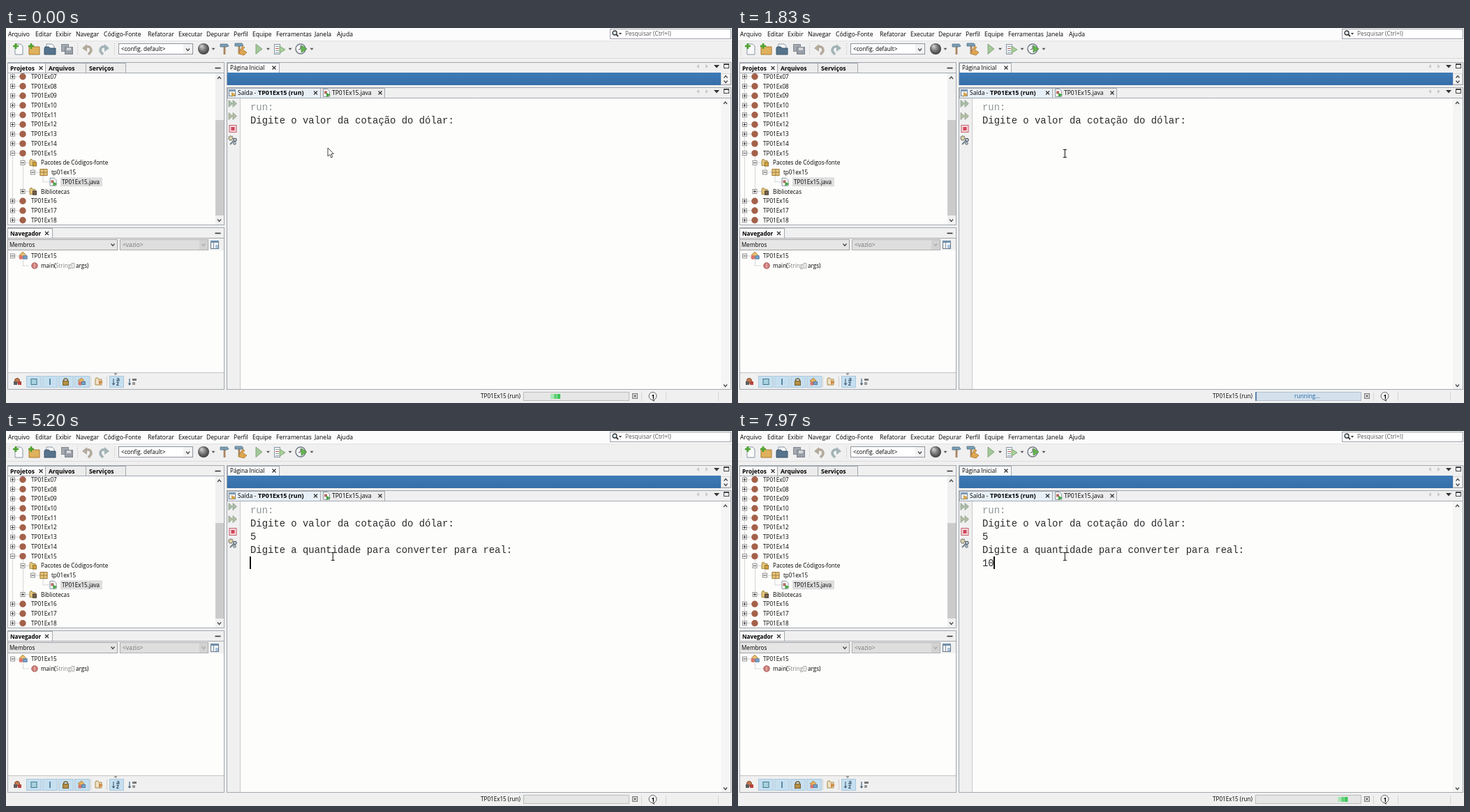
Recreate the animation shown at these times as an HTML page with a canvas. Size 1040 px wide and 538 px high, loop 8000 ms.

```html
<!DOCTYPE html>
<html lang="pt">
<head>
<meta charset="utf-8">
<title>Saída do programa</title>
<style>
html, body { margin: 0; width: 100%; height: 100%; overflow: hidden; background: #f0f0f0; }
canvas { display: block; width: 1040px; height: 538px; }
</style>
</head>
<body>
<canvas id="stage" width="1040" height="538"></canvas>
<script>
const g = document.getElementById('stage').getContext('2d');
const LOOP = 8000, PANEL = '#f0f0f0', PAPER = '#fdfdfc', EDGE = '#a3a9b0';
const UI = '"Open Sans", "Noto Sans", sans-serif';
const MONO = '"Liberation Mono", monospace';

function box(x, y, w, h, fill, edge) {
  if (fill) { g.fillStyle = fill; g.fillRect(x, y, w, h); }
  if (edge) { g.strokeStyle = edge; g.lineWidth = 1; g.strokeRect(x + .5, y + .5, w - 1, h - 1); }
}
function path(pts, fill, edge, width = 1, close = true) {
  g.beginPath();
  for (let i = 0; i < pts.length; i += 2) g.lineTo(pts[i], pts[i + 1]);
  if (close) g.closePath();
  if (fill) { g.fillStyle = fill; g.fill(); }
  if (edge) { g.strokeStyle = edge; g.lineWidth = width; g.stroke(); }
}
const line = (pts, color, width = 1) => path(pts, null, color, width, false);
function disc(x, y, r, fill, edge, width = 1) {
  g.beginPath();
  g.arc(x, y, r, 0, 7);
  if (fill) { g.fillStyle = fill; g.fill(); }
  if (edge) { g.strokeStyle = edge; g.lineWidth = width; g.stroke(); }
}
function text(s, x, y, size = 8.15, color = '#000', weight = 400, family = UI) {
  g.font = `${weight} ${size}px ${family}`;
  g.fillStyle = color;
  g.fillText(s, x, y);
}
const mono = (s, y, color = '#2b2b2b') => text(s, 350, y, 13.9, color, 400, MONO);
const down = (x, y, r = 2.5, color = '#555') => path([x - r, y - r / 2, x + r, y - r / 2, x, y + r / 2 + .5], color);
const cross = (x, y) => {
  line([x - 2.5, y - 2.5, x + 2.5, y + 2.5], '#333', 1.2);
  line([x + 2.5, y - 2.5, x - 2.5, y + 2.5], '#333', 1.2);
};
const chevron = (x, y, dir, color = '#444') => line([x - 2.5, y - dir * 1.5, x, y + dir * 1.5, x + 2.5, y - dir * 1.5], color, 1.2);

function folder(x, y, w, h, fill, edge) {
  path([x, y + 2, x, y + h, x + w, y + h, x + w, y + 2, x + w * .5, y + 2, x + w * .4, y, x + 1, y], fill, edge);
}
function page(x, y, w, h) {
  path([x, y, x + w - 3, y, x + w, y + 3, x + w, y + h, x, y + h], '#fafafa', '#8796a5');
}
function plus(x, y) {
  line([x - 4, y, x + 4, y], '#4da32f', 2.6);
  line([x, y - 4, x, y + 4], '#4da32f', 2.6);
}
function sourceFile(x, y) {
  page(x - 4.5, y - 5.5, 9, 11);
  box(x - 3, y - 2.5, 4, 4, '#b96a63');
  path([x, y, x + 6, y + 3, x, y + 6], '#3da33c');
}
function hammer(x, y) {
  line([x, y - 3, x, y + 8], '#a8855f', 2.8);
  path([x - 6, y - 7, x + 4, y - 7, x + 6, y - 4, x + 3, y - 3, x - 6, y - 3], '#7d9fb4', '#4c7086', .8);
}
function curl(x, y, dir, color) {
  g.beginPath();
  g.moveTo(x - dir * 4, y - 2);
  g.bezierCurveTo(x + dir * 3, y - 6, x + dir * 9, y + 1, x + dir, y + 8);
  g.strokeStyle = color;
  g.lineWidth = 3.6;
  g.stroke();
  path([x - dir * 8, y - 1, x - dir, y - 7, x - dir, y + 4], color);
}

function menuBar() {
  box(0, 0, 1040, 18, '#fcfcfc');
  const items = [['Arquivo', 3], ['Editar', 42], ['Exibir', 71], ['Navegar', 100], ['Código-Fonte', 140],
    ['Refatorar', 203], ['Executar', 247], ['Depurar', 287], ['Perfil', 326], ['Equipe', 353],
    ['Ferramentas', 387], ['Janela', 442], ['Ajuda', 474]];
  for (const [s, x] of items) text(s, x, 12, 8.6);
  box(865, 1, 174, 15, '#fff', '#9aa0a8');
  disc(872, 7, 3, '#dbe8f2', '#333', 1.3);
  line([874, 9, 877, 12], '#333', 1.8);
  down(880, 8, 2.2, '#333');
  text('Pesquisar (Ctrl+I)', 887, 11, 8.3, '#555');
}

function toolBar() {
  line([0, 18.5, 1040, 18.5], '#e2e2e2');
  line([0, 43.5, 1040, 43.5], '#dcdcdc');
  for (const x of [4, 102, 155]) for (let y = 22; y < 40; y += 3) box(x, y, 1, 1, '#b5b5b5');
  page(13, 23, 11, 15);
  plus(14, 26);
  folder(33, 25, 15, 13, '#e0b15c', '#a77b32');
  plus(36, 26);
  page(58, 23, 11, 10);
  folder(55, 27, 16, 11, '#55738c', '#3c5569');
  box(79, 23, 11, 11, '#a4a9b0', '#858b93');
  box(84, 27, 12, 11, '#989ea7', '#7d848c');
  box(87, 28, 6, 4, '#d4d6da');
  curl(117, 30, 1, '#b3aa9c');
  curl(140, 30, -1, '#a3b3b6');
  box(161, 22, 107, 16, '#fff', '#8f969e');
  box(254, 23, 13, 14, '#f2f2f2');
  text('<config. default>', 165, 33);
  chevron(260.5, 31, 1);
  const ball = g.createRadialGradient(280, 26, 1, 283, 30, 9);
  ball.addColorStop(0, '#c9c9c9');
  ball.addColorStop(.5, '#777');
  ball.addColorStop(1, '#333');
  disc(283, 30, 8, ball);
  for (const x of [297, 375.5, 407, 438]) down(x, 30);
  hammer(313, 30);
  hammer(334, 29);
  path([339, 26, 342, 28, 339, 31, 345, 35, 341, 39, 333, 37, 336, 31], '#dda552', '#a9762e', .8);
  path([358, 23, 367, 30, 358, 37.5], '#a4c79a', '#82a77a');
  box(384, 23, 9, 15, '#f6f6f6', '#8796a5');
  for (let y = 26; y < 37; y += 3) box(386, y, 5, 1, y === 29 ? '#d05c50' : '#8b9fb0');
  path([392, 26, 400, 31, 392, 36], '#a9cf9c', '#6f9a63', .8);
  disc(422, 30, 7, '#f4f6f8', '#737d87', 1.5);
  line([422, 25, 422, 30, 419, 31], '#555');
  path([423, 25, 431, 30, 423, 35], '#64b54f', '#468a37', .8);
}

function tab(x, y, w, h, fill) {
  box(x, y, w, h, fill, EDGE);
}
function minus(x, y) {
  line([x - 4, y, x + 4, y], '#333', 1.6);
}
function toggle(x, y, open) {
  box(x - 3.5, y - 3.5, 7, 7, '#fff', '#929292');
  line([x - 2, y, x + 2, y], '#333');
  if (!open) line([x, y - 2, x, y + 2], '#333');
}
function dots(x0, y0, x1, y1) {
  g.setLineDash([1, 1]);
  line([x0, y0, x1, y1], '#b0b0b0');
  g.setLineDash([]);
}

function projectRow(name, y, open) {
  dots(13, y, 20, y);
  toggle(9.5, y, open);
  disc(24, y, 4.7, '#a4614a');
  text(name, 36, y + 3);
}

function projects() {
  box(2, 49, 311, 234, PANEL, EDGE);
  line([2, 64.5, 312, 64.5], EDGE);
  tab(2, 50, 55, 15, '#fafafa');
  tab(56, 50, 59, 15, '#ececec');
  tab(114, 50, 58, 15, '#ececec');
  text('Projetos', 6, 60.5, 8.45, '#000', 700);
  cross(50, 57.5);
  text('Arquivos', 61, 60.5, 8.5, '#000', 700);
  text('Serviços', 119, 60.5, 8.7, '#000', 700);
  minus(303.5, 57.5);
  box(3, 65, 309, 217, PAPER);
  g.save();
  g.beginPath();
  g.rect(3, 65, 297, 217);
  g.clip();
  const row = i => 69.8 + i * 13.73;
  dots(9.5, 65, 9.5, row(15));
  dots(24.5, row(8) + 5, 24.5, row(12));
  dots(39, row(9) + 5, 39, row(10));
  dots(53, row(10) + 5, 53, row(11));
  for (let i = 0; i < 9; i++) projectRow('TP01Ex' + String(i + 7).padStart(2, '0'), row(i), i === 8);
  for (let i = 13; i < 16; i++) projectRow('TP01Ex' + (i + 3), row(i), false);
  dots(24, row(9), 34, row(9));
  toggle(24, row(9), true);
  folder(34, row(9) - 5, 8, 9, '#e3c57c', '#a58a46');
  box(38, row(9) - 1, 6, 6, '#d6a542', '#92702b');
  text('Pacotes de Códigos-fonte', 50, row(9) + 3);
  dots(39, row(10), 48, row(10));
  toggle(38.5, row(10), true);
  box(48.5, row(10) - 5, 11, 10, '#e8c67d', '#a27e3c');
  line([54, row(10) - 5, 54, row(10) + 5], '#a27e3c');
  line([48.5, row(10), 59.5, row(10)], '#a27e3c');
  text('tp01ex15', 65, row(10) + 3);
  dots(53, row(11), 62, row(11));
  sourceFile(67.5, row(11));
  box(78, row(11) - 6.5, 60, 13, '#dedede');
  text('TP01Ex15.java', 80, row(11) + 3);
  dots(24, row(12), 34, row(12));
  toggle(24, row(12), false);
  folder(34, row(12) - 5, 8, 9, '#e3c57c', '#a58a46');
  box(38, row(12) - 1, 6, 6, '#77624d', '#4d4034');
  text('Bibliotecas', 50, row(12) + 3);
  g.restore();
  box(300, 65, 12, 217, PANEL);
  box(300, 132, 12, 137, '#cbcbcb');
  chevron(305.5, 71.5, -1);
  chevron(305.5, 276, 1);
}

function navigator() {
  box(2, 286, 311, 233, PANEL, EDGE);
  tab(2, 287, 65, 15, '#fafafa');
  text('Navegador', 6, 297.5, 8.15, '#000', 700);
  cross(58.5, 294.5);
  minus(303.5, 294.5);
  line([2, 301.5, 312, 301.5], EDGE);
  box(2, 303, 158, 16, '#e6e6e6', '#a2a2a2');
  text('Membros', 5, 314);
  chevron(153, 311, 1);
  box(163, 303, 127, 16, '#dedede', '#b2b2b2');
  text('<vazio>', 167, 314, 8.4, '#777');
  box(277, 304, 12, 14, '#d2d2d2');
  chevron(283, 311, 1, '#aaa');
  box(293, 305, 12, 12, '#f8f8f8', '#65798b');
  box(293, 305, 12, 3, '#6f8fab');
  line([297.5, 308, 297.5, 317], '#7d8fa0');
  box(300, 311, 4, 5, '#a9c4da');
  box(3, 319, 309, 175, PAPER);
  line([3, 494.5, 312, 494.5], '#c4c4c4');
  dots(13, 327, 18, 327);
  dots(24.5, 332, 24.5, 341);
  dots(24.5, 341, 33, 341);
  toggle(9.5, 327, true);
  path([24, 321, 29, 326, 24, 331, 19, 326], '#e7bd6d', '#a17b3b', .8);
  disc(21.5, 329, 3, '#d9776c');
  box(24.5, 326.5, 6, 5, '#7ca9d2', '#54799c');
  text('TP01Ex15', 36, 330);
  disc(41, 341, 4.2, '#d0807c', '#a45450');
  line([41, 337.5, 41, 344.5], '#f0c5c2');
  text('main(', 50, 344);
  text('String[]', 71, 344, 8.15, '#808080');
  text('args)', 100, 344);
  navTools();
}

function navTools() {
  for (const x of [29, 52, 75, 98, 148]) box(x, 499, x === 148 ? 21 : 22, 17, '#c6dfef', '#a9c9de');
  down(157, 496.5, 2.5, '#888');
  disc(16, 506, 3.5, '#c47a50', '#844a2b');
  box(11, 507, 5, 5, '#5d5d5d');
  box(17, 507, 5, 5, '#b6433d');
  box(35.5, 503, 9, 9, '#a7d1df', '#42798e');
  line([63, 503, 63, 512], '#5688a5', 2);
  g.beginPath();
  g.arc(85.5, 506, 3, Math.PI, 0);
  g.strokeStyle = '#77612f';
  g.lineWidth = 1.4;
  g.stroke();
  box(81, 506, 9, 7, '#b58f43', '#77612f');
  path([108, 502, 112, 506, 108, 510, 103, 506], '#e3b261', '#9b7234', .8);
  disc(106, 510, 2.7, '#d2766c');
  box(108, 507, 6, 5, '#79a5cf', '#54799c');
  for (const x of [121, 144]) line([x + .5, 500, x + .5, 515], '#cfcfcf');
  folder(128, 502, 9, 10, '#efe3c5', '#a58a46');
  path([133, 505, 139, 508, 133, 512], '#d08a4a');
  for (const x of [154, 177]) {
    line([x, 503, x, 512], '#46647e', 1.2);
    down(x, 511, 2.5, '#46647e');
  }
  text('a', 158, 507, 8.2, '#35536d', 700);
  text('z', 158, 513, 8.2, '#35536d', 700);
  box(181, 503, 6, 3, '#777');
  box(181, 508, 4, 4, '#999');
}

function paneButtons(y) {
  path([989, y, 993, y - 3, 993, y + 3], '#c9c9c9');
  path([1006, y, 1002, y - 3, 1002, y + 3], '#c9c9c9');
  down(1018, y, 4, '#333');
  box(1028, y - 4, 8, 7, '#fff', '#444');
  box(1028, y - 4, 8, 2, '#444');
}

function editor() {
  box(316, 49, 723, 33, PANEL, EDGE);
  tab(317, 50, 75, 15, '#fafafa');
  text('Página Inicial', 321, 60);
  cross(384, 57);
  paneButtons(55);
  const sky = g.createLinearGradient(0, 64, 0, 82);
  sky.addColorStop(0, '#3d7bb7');
  sky.addColorStop(1, '#366ea8');
  box(317, 64, 707, 18, sky);
  box(1024, 65, 14, 16, '#f4f4f4', '#d6d6d6');
  chevron(1031, 70, -1);
  chevron(1031, 77, 1);

  box(316, 85, 723, 434, PANEL, EDGE);
  tab(317, 86, 134, 15, '#e8f0f7');
  tab(450, 86, 93, 15, '#ececec');
  box(319, 88, 10, 10, '#f4f4f4', '#73818e');
  box(319, 88, 10, 3, '#7d9ab5');
  path([323, 92, 330, 95.5, 323, 99], '#d6a54b');
  text('Saída - ', 332, 96, 8.45);
  text('TP01Ex15 (run)', 361, 96, 8.95, '#000', 700);
  cross(443.5, 93);
  sourceFile(459, 93);
  text('TP01Ex15.java', 467, 96, 8.5);
  cross(536, 93);
  paneButtons(91);
  line([317, 100.5, 1038, 100.5], EDGE);
  box(336, 101, 688, 417, PAPER);
  line([335.5, 101, 335.5, 518], '#c9c9c9');
  box(1024, 101, 14, 417, '#f5f5f5');
  chevron(1030.5, 107.5, -1);
  chevron(1030.5, 513, 1);
  for (const y of [108.5, 126.5])
    for (const x of [319, 325]) path([x, y - 5, x + 5.5, y, x, y + 5], y < 110 ? '#a9bda7' : '#b6bea2', '#8f9f8c', .8);
  box(319.5, 139, 11, 11, '#f6dadd', '#c4626e');
  box(322.5, 142, 5, 5, '#d04558');
  // Settings: a toothed wheel beside a small wrench.
  g.setLineDash([1.5, 1]);
  disc(322, 158, 3, '#ddd3a8', '#666', 1.5);
  g.setLineDash([]);
  line([321, 167, 326, 162], '#6c7c88', 1.8);
  disc(328, 160.5, 2, '#f0f0f0', '#55646f', 1.3);
  disc(327.5, 165.5, 1.8, '#c5ccd2', '#55646f');
}

function statusBar() {
  text('TP01Ex15 (run)', 680, 531);
  box(897, 524, 8, 8, '#e8e8e8', '#777');
  line([899, 526, 903, 530], '#555');
  line([903, 526, 899, 530], '#555');
  for (const x of [910, 945, 1020]) line([x + .5, 523, x + .5, 535], '#d4d4d4');
  disc(926.5, 528, 5.5, '#f8f8f8', '#666');
  path([924, 533, 929, 533, 929, 536], '#666');
  text('1', 924.5, 531.5, 8.5, '#000', 700);
}

const IDLE = 1800, ENTER = 4770, RESUME = 5200;

function progress(t) {
  if (t >= IDLE && t < RESUME) {
    box(741, 522, 152, 13, '#d4e1ec', '#b4c2ce');
    box(741, 522, 2, 13, '#5b84ac');
    text('running...', 797, 531, 8.3, '#2468a8');
    return;
  }
  box(741, 522, 152, 13, '#e6e6e6', '#bdbdbd');
  // The block runs past the right end, then starts over on the left.
  const travelled = t < IDLE ? 52 + t * .097 : (t - RESUME) * .1034;
  const right = 742 + travelled % 155;
  g.save();
  g.beginPath();
  g.rect(742, 524, 150, 9);
  g.clip();
  ['#a5e6b0', '#5fd176', '#3cc558'].forEach((c, i) => box(right - 14 + i * 4.8, 525, 4.4, 7, c));
  g.restore();
}

function caret(t, column, baseline, since) {
  if ((t - since + LOOP) % 1000 < 500) box(Math.floor(349.5 + column * 8.34), baseline - 14, 2, 18, '#111');
}

function output(t) {
  mono('run:', 118, '#8f9598');
  mono('Digite o valor da cotação do dólar:', 137);
  if (t >= 3800) mono('5', 156);
  if (t < 3800) caret(t, 0, 156, 130);
  else if (t < ENTER) caret(t, 1, 156, 3830);
  else {
    mono('Digite a quantidade para converter para real:', 175);
    const typed = t < 7400 ? '' : t < 7600 ? '1' : '10';
    mono(typed, 194);
    caret(t, typed.length, 194, [4830, 7400, 7600][typed.length]);
  }
}

function pointer(t) {
  const k = Math.min(1, Math.max(0, (t - 100) / 300));
  const e = k * k * (3 - 2 * k), x = 461 + 7 * e, y = 172 + 8 * e;
  if (t < 300) {
    path([x, y, x, y + 12, x + 2.8, y + 9.5, x + 4.8, y + 14, x + 6.8, y + 13, x + 4.8, y + 8.8, x + 8.3, y + 8.5],
      '#fff', '#333', .9);
    return;
  }
  line([x + .3, y - 5.5, x + .3, y + 5.5], '#222', 1.1);
  for (const d of [-5.5, 5.5]) line([x - 2.2, y + d, x + 2.8, y + d], '#222', 1.1);
}

function draw(now) {
  const t = now % LOOP;
  box(0, 0, 1040, 538, PANEL);
  menuBar();
  toolBar();
  projects();
  navigator();
  editor();
  statusBar();
  progress(t);
  output(t);
  pointer(t);
}

const start = performance.now();
function tick() {
  draw(performance.now() - start);
  requestAnimationFrame(tick);
}
tick();
</script>
</body>
</html>
```
